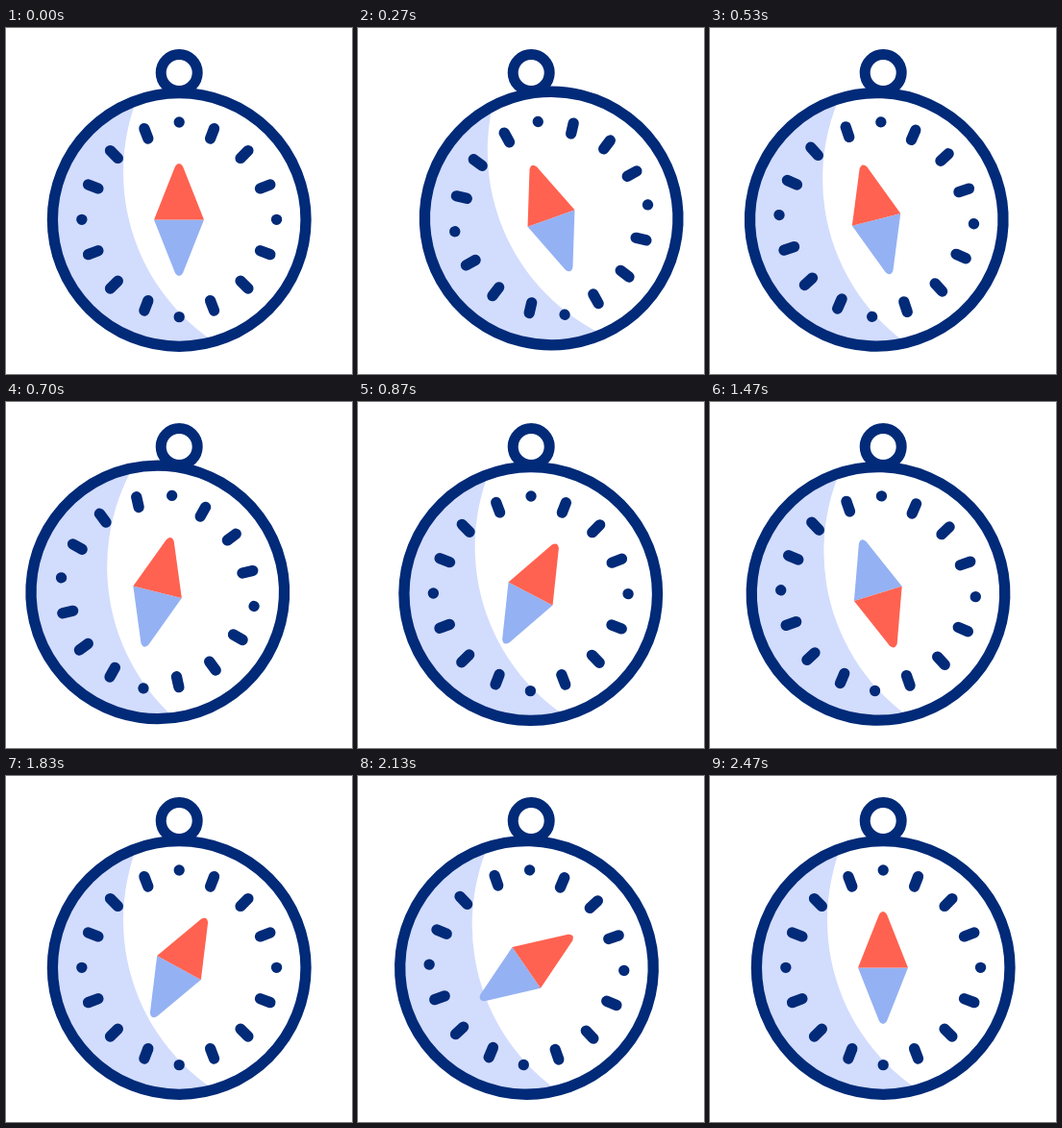
Recreate the animation shown at these times as an HTML page. Size 360 by 360 pixels, loop 2.57 s.

```html
<!DOCTYPE html>
<html lang="en">
<head>
<meta charset="utf-8">
<title>Compass</title>
<style>
  html, body { margin: 0; height: 100%; overflow: hidden; background: #fff; }
  svg { display: block; width: 100vw; height: 100vh; }
</style>
</head>
<body>
<svg viewBox="0 0 360 360">
  <defs>
    <clipPath id="face"><circle cx="180.2" cy="199.5" r="132"/></clipPath>
  </defs>
  <g id="body">
    <g clip-path="url(#face)">
      <rect width="360" height="360" fill="#d2dcfd"/>
      <circle cx="334" cy="150" r="212" fill="#fff"/>
    </g>
    <g fill="none" stroke="#012a78" stroke-width="11.3" stroke-linecap="round">
      <circle cx="180.2" cy="199.5" r="131.8"/>
      <path id="ticks" transform="translate(180.2 199.3)"/>
    </g>
    <g id="needle">
      <path d="M-26 0L-4 55.5Q0 61.5 4 55.5L26 0Z" fill="#94b1f3"/>
      <path d="M-26 0L-4 -55.5Q0 -61.5 4 -55.5L26 0Z" fill="#ff6250"/>
    </g>
  </g>
  <circle cx="180.2" cy="46.5" r="19" fill="#fff" stroke="#012a78" stroke-width="11"/>
</svg>
<script>
  const LOOP = 2570, FPS = 30, LAST = 74;
  const $ = id => document.getElementById(id);

  // Keyframes: [frame, degrees]
  const swing = [[0, 0], [10, -8.8], [20, 8.8], [30, -4.5], [40, 4.5], [50, -2.75], [60, 2.75], [70, 0]];
  const spin = [[0, 0], [14, -19.5], [28, 30.3], [34, 30.3], [60, 427], [74, 360]];

  function valueAt(keys, frame) {
    const i = keys.findIndex(([f]) => f > frame);
    if (i < 0) return keys[keys.length - 1][1];
    const [f0, a] = keys[i - 1], [f1, b] = keys[i];
    const u = (frame - f0) / (f1 - f0);
    return a + (b - a) * u * u * (3 - 2 * u);
  }

  // Dots on the four main points, three dashes between each pair
  let ticks = '';
  for (let quarter = 0; quarter < 360; quarter += 90) {
    for (const offset of [0, 21, 45, 69]) {
      const angle = (quarter + offset) * Math.PI / 180;
      const point = r => `${r * Math.sin(angle)} ${-r * Math.cos(angle)}`;
      ticks += `M${point(offset ? 90.3 : 101.3)}L${point(101.4)}`;
    }
  }
  $('ticks').setAttribute('d', ticks);

  function draw() {
    const time = performance.now() % LOOP;
    const frame = Math.min(LAST, Math.floor((time + 4) * FPS / 1000));
    $('body').setAttribute('transform', `rotate(${valueAt(swing, frame)} 180.2 46.5)`);
    $('needle').setAttribute('transform', `translate(180 199.5) rotate(${valueAt(spin, frame)})`);
    requestAnimationFrame(draw);
  }
  draw();
</script>
</body>
</html>
```
